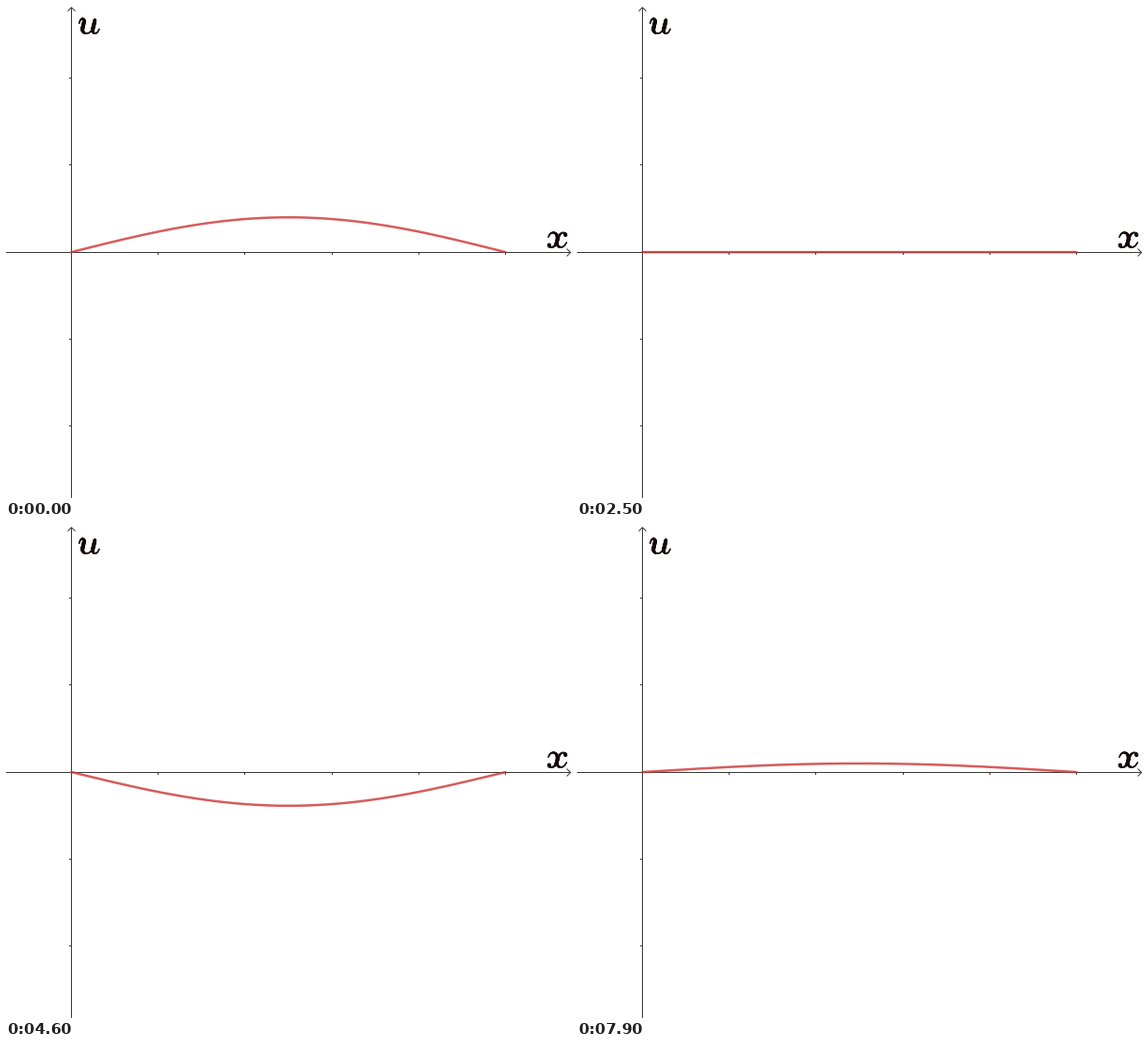
These frames come from a looping animation (600x522 px, 8000 ms). A matplotlib script:

```python
import numpy as np
import matplotlib.pyplot as plt
from matplotlib.animation import FuncAnimation
from matplotlib.collections import LineCollection

W, H, DPI = 600, 522, 100
PX = 72 / DPI                 # points per pixel
X0, Y0 = 69.45, 261.1         # origin on the stage
UNIT = 92.2                   # pixels per axis unit
LENGTH = 5 * UNIT
AMPLITUDE = 0.4 * UNIT
PERIOD = 10.0                 # seconds per oscillation
FRAMES, STEP = 80, 100
INK, LABEL = "#383838", "#140808"

# Pen strokes of the labels: x, height above the baseline, pen width.
LETTER_U = [
    [(0.7, 11.2, 1.4), (2.2, 14.8, 1.7), (4.4, 16.0, 2.4), (6.0, 14.0, 3.6),
     (5.2, 9.5, 4.0), (4.3, 4.8, 3.8), (5.6, 1.6, 2.6), (9.0, 0.6, 1.6),
     (12.4, 2.0, 1.5), (14.6, 4.8, 1.6)],
    [(17.5, 14.8, 3.6), (16.6, 10.5, 3.9), (15.4, 5.6, 3.9), (15.3, 2.6, 3.0),
     (17.3, 0.7, 1.8), (20.0, 1.6, 1.4), (22.2, 5.4, 1.4)],
]
LETTER_X = [
    [(1.7, 11.3, 1.4), (3.6, 14.8, 1.6), (7.1, 16.2, 2.0), (10.4, 14.2, 3.0),
     (11.3, 10.0, 3.4), (10.2, 5.6, 3.2), (8.3, 2.0, 2.2), (5.0, 0.6, 1.6),
     (2.9, 1.3, 2.0), (2.6, 3.0, 4.4)],
    [(20.0, 13.6, 4.4), (18.9, 15.8, 1.8), (16.0, 15.8, 1.7),
     (13.2, 13.0, 2.4), (12.0, 9.5, 3.2), (11.0, 5.6, 3.2), (12.0, 2.0, 2.6),
     (15.2, 0.7, 1.7), (18.4, 2.0, 1.4), (21.2, 5.8, 1.4)],
]

fig = plt.figure(figsize=(W / DPI, H / DPI), dpi=DPI, facecolor="white")
ax = fig.add_axes([0, 0, 1, 1])
ax.set_xlim(0, W)
ax.set_ylim(H, 0)
ax.axis("off")


def crisp(v):
    """Centre of the pixel that holds v."""
    return np.floor(v) + 0.5


def stroke(xs, ys):
    ax.plot(xs, ys, color=INK, lw=PX, solid_capstyle="butt",
            solid_joinstyle="miter", snap=False)


def spline(points, steps=8):
    """Catmull-Rom curve through the points."""
    p = np.array(points)
    p = np.vstack([2 * p[0] - p[1], p, 2 * p[-1] - p[-2]])
    t = np.linspace(0, 1, steps, endpoint=False)[:, None]
    spans = [b + t / 2 * (c - a + t * (2 * a - 5 * b + 4 * c - d
                                       + t * (3 * (b - c) + d - a)))
             for a, b, c, d in zip(p, p[1:], p[2:], p[3:])]
    return np.vstack(spans + [p[-2:-1]])


def letter(strokes, left, baseline):
    for points in strokes:
        x, y, width = spline(points).T
        line = np.column_stack([left + x, baseline - y])
        ax.add_collection(LineCollection(
            np.stack([line[:-1], line[1:]], axis=1), colors=LABEL,
            linewidths=(width[:-1] + width[1:]) / 2 * PX, capstyle="round"),
            autolim=False)


cx, cy = crisp(X0), crisp(Y0)
right, top = W - 0.5, 1.5
stroke([0, right], [cy, cy])
stroke([cx, cx], [H, top])
stroke([right - 4, right, right - 4], [cy - 4, cy, cy + 4])
stroke([cx - 4, cx, cx + 4], [top + 4, top, top + 4])

for k in range(1, 6):
    stroke([crisp(X0 + k * UNIT)] * 2, [cy, cy + 2.5])
for k in (-2, -1, 1, 2):
    stroke([cx - 2.5, cx], [crisp(Y0 - k * UNIT)] * 2)

letter(LETTER_U, 76.9, 29.7)
letter(LETTER_X, 574.2, 256.6)

x = np.linspace(0, LENGTH, 201)
mode = AMPLITUDE * np.sin(np.pi * x / LENGTH)
string, = ax.plot(X0 + x, Y0 - mode, color="#cc3333", alpha=0.8, lw=2.5 * PX,
                  solid_capstyle="round", solid_joinstyle="round", snap=False)


def update(i):
    t = i * STEP / 1000
    string.set_ydata(Y0 - mode * np.cos(2 * np.pi * t / PERIOD))
    return string,


anim = FuncAnimation(fig, update, frames=FRAMES, interval=STEP, repeat=True,
                     repeat_delay=0, blit=False)
plt.show()
```
